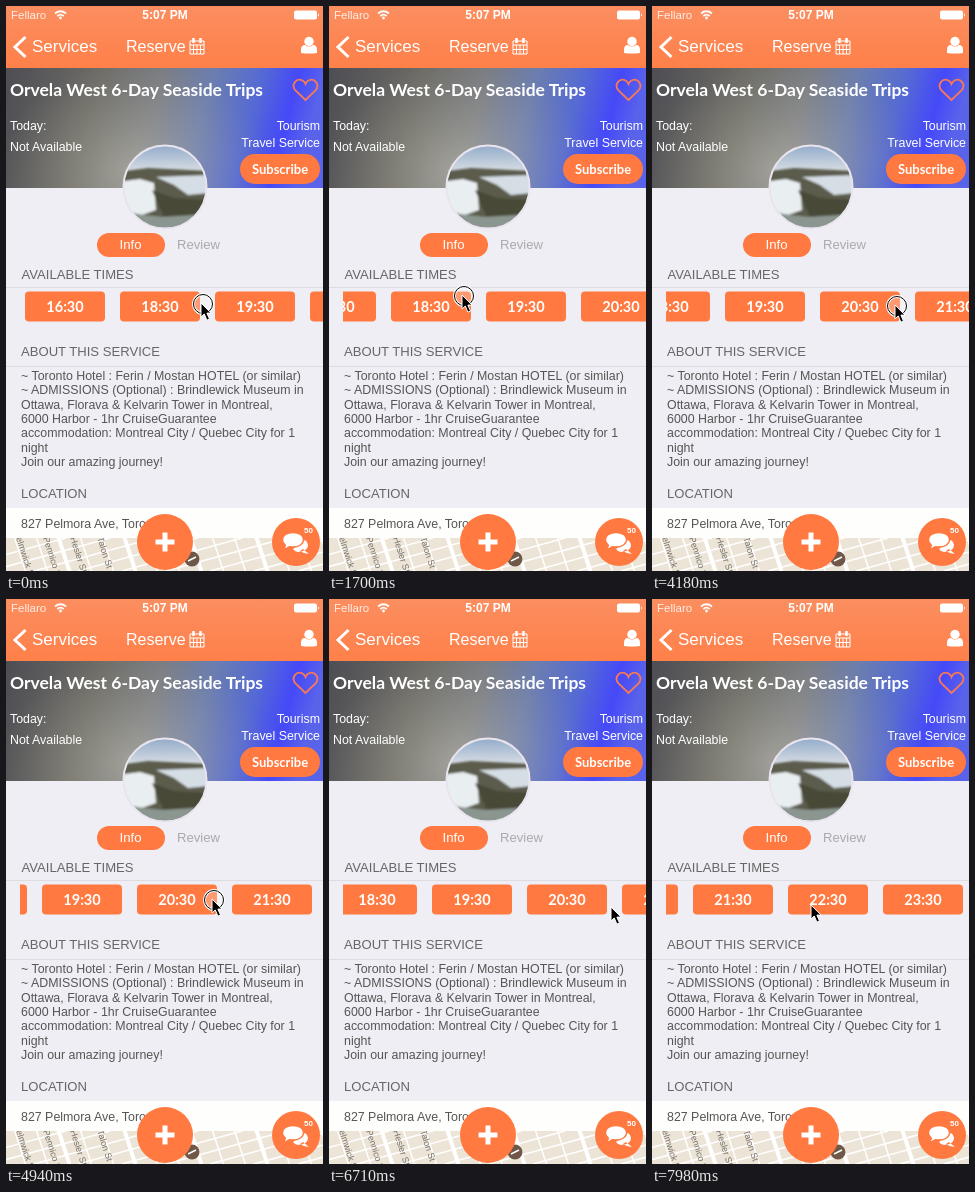
Recreate the animation shown at these times as an HTML page. Size 317x565 px, loop 8 s.

```html
<!DOCTYPE html>
<html lang="en">
<head>
<meta charset="utf-8">
<title>Tour booking screen</title>
<style>
  html, body { margin: 0; height: 100%; overflow: hidden; background: #efeef4; }
  svg { display: block; width: 100vw; height: 100vh; font: 12.4px "Liberation Sans", Arial, sans-serif; }
  .rounded { font-family: Lato, sans-serif; font-weight: 700; }
  .white { fill: #fff; }
  .orange { fill: #ff7940; }
  .heading { font-size: 13.1px; fill: #666; }
  .body { fill: #555; }
  .street { font-size: 9px; fill: #77716a; }
  .line { fill: none; stroke: #fff; }
  .end { text-anchor: end; }
  .mid { text-anchor: middle; }
</style>
</head>
<body>
<svg viewBox="0 0 317 565" preserveAspectRatio="none">
  <defs>
    <linearGradient id="bar" x2="0" y2="1">
      <stop stop-color="#fb8e60"/><stop offset="1" stop-color="#ff8049"/>
    </linearGradient>
    <linearGradient id="cover" y2=".1">
      <stop stop-color="#4d4d54"/><stop offset=".3" stop-color="#6d6c66"/>
      <stop offset=".5" stop-color="#7a7d84"/><stop offset=".65" stop-color="#6c7eae"/>
      <stop offset=".8" stop-color="#566bd2"/><stop offset=".92" stop-color="#4549f8"/>
      <stop offset="1" stop-color="#5963ea"/>
    </linearGradient>
    <radialGradient id="glow">
      <stop stop-color="#cfcbb8" stop-opacity=".5"/><stop offset="1" stop-color="#a8a692" stop-opacity="0"/>
    </radialGradient>
    <linearGradient id="sky" x2="0" y2="1">
      <stop stop-color="#8fa9c9"/><stop offset=".35" stop-color="#dfe3e6"/>
    </linearGradient>
    <filter id="haze"><feGaussianBlur stdDeviation="1"/></filter>
    <clipPath id="coverClip"><path d="M0 62h317v120H0z"/></clipPath>
    <clipPath id="avatarClip"><circle cx="159" cy="181" r="41"/></clipPath>
    <clipPath id="stripClip"><path d="M14 284h303v34H14z"/></clipPath>
    <clipPath id="mapClip"><path d="M0 532h317v33H0z"/></clipPath>
  </defs>

  <path fill="#efeef4" d="M0 0h317v565H0z"/>

  <!-- Cover picture -->
  <g clip-path="url(#coverClip)">
    <path fill="url(#cover)" d="M0 62h317v120H0z"/>
    <ellipse cx="130" cy="165" rx="135" ry="110" fill="url(#glow)"/>
  </g>

  <!-- Status bar and navigation -->
  <path fill="url(#bar)" d="M0 0h317v62H0z"/>
  <g class="white">
    <text x="5" y="12.5" font-size="11.5" opacity=".85">Fellaro</text>
    <text class="mid" x="159" y="12.5" font-size="12" font-weight="700">5:07 PM</text>
    <rect x="288" y="4.5" width="23" height="9" rx="2"/>
    <path d="M312 7.5q2 1.5 0 3z"/>
    <text x="26" y="46" font-size="17">Services</text>
    <text x="120" y="46" font-size="16">Reserve</text>
    <circle cx="303" cy="35.5" r="4.7"/>
    <path d="M295 47v-3q0-5 4-5q4 3 8 0q4 0 4 5v3q-8 1-16 0z"/>
    <circle cx="54.5" cy="12" r="1.4"/>
  </g>
  <g class="line">
    <path stroke-width="1.7" d="M49 7.5q5.500-4.500 11 0M51.300 10q3.200-2.600 6.400 0"/>
    <path stroke-width="3" d="M19.500 31L9 41l10.500 10"/>
    <path d="M184 35h14v13h-14zM184 39h14M184 43.500h14M187.500 39v9M191 39v9M194.500 39v9"/>
    <path stroke-width="2.5" d="M187.500 32v5M194.500 32v5"/>
  </g>

  <!-- Cover text -->
  <g class="white">
    <text class="rounded" x="4" y="90" font-size="17.5">Orvela West 6-Day Seaside Trips</text>
    <text x="4" y="124">Today:</text>
    <text x="4" y="145">Not Available</text>
    <text class="end" x="314" y="124">Tourism</text>
    <text class="end" x="314" y="140.5">Travel Service</text>
  </g>
  <path fill="none" stroke="#f97855" stroke-width="1.8" d="M299.500 94l-10-9.500c-5-6 1-13 7-10q2 1 3 3.500q1-2.500 3-3.500c6-3 12 4 7 10z"/>
  <rect class="orange" x="234" y="148" width="80" height="30" rx="15"/>
  <text class="rounded white mid" x="274" y="168" font-size="13">Subscribe</text>

  <!-- Round picture -->
  <g clip-path="url(#avatarClip)">
    <path fill="url(#sky)" d="M116 138h86v86h-86z"/>
    <g filter="url(#haze)">
      <path fill="#5b5c4d" d="M112 166l30-4 62 3v62h-92z"/>
      <path fill="#e9eef1" d="M112 176l22-3 14 4 2 27-14 5-24-5z"/>
      <path fill="#d5dee5" d="M150 171l54-2v18l-22 2-14-10z"/>
      <path fill="#484a38" d="M146 184l22 8 36 2v18l-44 4z"/>
      <path fill="#8c9691" d="M112 206l44 5 48-3v20h-92z"/>
    </g>
  </g>
  <circle cx="159" cy="181" r="41.5" fill="none" stroke="#e9e4ee" stroke-width="2"/>

  <!-- Tabs and sections -->
  <rect class="orange" x="91" y="227" width="68" height="24" rx="12"/>
  <text class="white mid" x="124.5" y="243" font-size="13.2">Info</text>
  <text x="171" y="243" font-size="13.1" fill="#aaa9ae">Review</text>
  <path stroke="#dddce1" d="M0 281.500h317M0 360.500h317"/>
  <g class="heading">
    <text x="15.5" y="273">AVAILABLE TIMES</text>
    <text x="15" y="349.5">ABOUT THIS SERVICE</text>
    <text x="15" y="492">LOCATION</text>
  </g>
  <g clip-path="url(#stripClip)"><g id="strip"></g></g>
  <g id="about" class="body"></g>
  <path fill="#fefefc" d="M0 502h317v30H0z"/>
  <text class="body" x="15" y="522">827 Pelmora Ave, Toronto</text>

  <!-- Map -->
  <g clip-path="url(#mapClip)">
    <path fill="#ece4d6" d="M0 532h317v33H0z"/>
    <g id="roads" class="line"></g>
    <g id="streets" class="street"></g>
    <circle cx="186" cy="553" r="7.5" fill="#6f5847"/>
    <path class="line" stroke-width="1.5" d="M182 555l8-4"/>
  </g>

  <!-- Floating buttons -->
  <circle class="orange" cx="159" cy="536" r="28"/>
  <path class="line" stroke-width="5" d="M149.500 536h19M159 526.500v19"/>
  <circle class="orange" cx="290" cy="536" r="24"/>
  <g class="white">
    <path d="M292 546q10-1 10-7q0-3-3-5l-12 9q2 3 5 3zM297 543l6 5q-5 0-9-3z"/>
    <path stroke="#ff7940" stroke-width="1.3" d="M287 526.500c6 0 10.500 3 10.500 7.200s-4.500 7.300-10.500 7.300q-2 0-3.500-.4q-3 2.400-6.500 2.600q2-1.500 2.500-4q-3-2.200-3-5.500c0-4.200 4.500-7.200 10.500-7.200z"/>
    <text x="298" y="527" font-size="8" font-weight="700">50</text>
  </g>

  <g id="cursor">
    <g id="press" fill="none">
      <circle cx="2" cy="1" r="9.5" fill="#fff" fill-opacity=".25" stroke="#fff" stroke-width="2.8"/>
      <circle cx="2" cy="1" r="9.5" stroke="#000"/>
    </g>
    <path id="arrow" d="M0 0v14l3.300-3 2.600 6.200 2.600-1.100-2.600-6H10z" stroke="#fff"/>
  </g>
</svg>

<script>
const LOOP = 8000;
const SLOP = 10;         // pointer travel before the strip follows
const MAX_SCROLL = 358;
const byId = id => document.getElementById(id);
const fill = (id, items, markup) => { byId(id).innerHTML = items.map(markup).join(''); };

fill('strip', [16, 18, 19, 20, 21, 22, 23], (hour, i) => `
  <g transform="translate(${19 + i * 95} 285.5)">
    <rect class="orange" width="80" height="30" rx="4"/>
    <text class="rounded white mid" x="40" y="20.5" font-size="14.5">${hour}:30</text>
  </g>`);

fill('about', [
  '~ Toronto Hotel : Ferin / Mostan HOTEL (or similar)',
  '~ ADMISSIONS (Optional) : Brindlewick Museum in',
  'Ottawa, Florava &amp; Kelvarin Tower in Montreal,',
  '6000 Harbor - 1hr CruiseGuarantee',
  'accommodation: Montreal City / Quebec City for 1',
  'night',
  'Join our amazing journey!'
], (line, i) => `<text x="15" y="${374 + i * 14.35}">${line}</text>`);

fill('roads', [...Array(16).keys()], i => `
  <path stroke-width="${i % 3 ? 1.5 : 4}" d="M${i * 22 - 14} 530l12 37"/>
  <path stroke-width="1.5" d="M${i * 44 - 60} 565l120-33"/>`);

fill('streets', ['elmwick St', 'Pennico St', 'Hesler St', 'Talon St'], (name, i) =>
  `<text transform="translate(${10 + i * 27} 532) rotate(72)">${name}</text>`);

const linear = part => part;
const easeOut = part => 1 - (1 - part) ** 2;

// Pointer moves; it rests in between.
const home = { x: 195, y: 297 };
const moves = [
  { start: 50, end: 510, x: 181, y: 293, ease: linear },
  { start: 800, end: 2450, x: 93, y: 286, ease: linear },
  { start: 2535, end: 2910, x: 231, y: 302 },
  { start: 3090, end: 3870, x: 297, y: 296 },
  { start: 3890, end: 4640, x: 210, y: 300 },
  { start: 4880, end: 5470, x: 189, y: 302 },
  { start: 5770, end: 6290, x: 283, y: 308 },
  { start: 6710, end: 7230, x: 146, y: 307 },
  { start: 7410, end: 7620, x: 9, y: 311 },
  { start: 7660, end: 7980, x: 159, y: 306 }
];
const drags = [[0, 2500], [3870, 5740], [5760, 6690], [6715, 7640]];

function pointerAt(time) {
  let { x, y } = home;
  for (const move of moves) {
    if (time <= move.start) break;
    const part = Math.min(1, (time - move.start) / (move.end - move.start));
    const eased = (move.ease || easeOut)(part);
    x += (move.x - x) * eased;
    y += (move.y - y) * eased;
  }
  return { x, y };
}

// Each drag carries the strip along with the pointer, less the slop.
function scrollAt(time) {
  let scroll = 0;
  for (const [start, end] of drags) {
    if (time <= start) break;
    const travel = pointerAt(start).x - pointerAt(Math.min(time, end)).x;
    scroll += Math.sign(travel) * Math.max(0, Math.abs(travel) - SLOP);
    scroll = Math.max(0, Math.min(MAX_SCROLL, scroll));
  }
  return scroll;
}

function draw() {
  const time = performance.now() % LOOP;
  const { x, y } = pointerAt(time);
  const pressed = drags.some(([start, end]) => time >= start && time < end);
  byId('strip').setAttribute('transform', `translate(${-Math.round(scrollAt(time))} 0)`);
  byId('cursor').setAttribute('transform', `translate(${Math.round(x)} ${Math.round(y)})`);
  byId('press').setAttribute('visibility', pressed ? 'visible' : 'hidden');
  requestAnimationFrame(draw);
}
draw();
</script>
</body>
</html>
```
